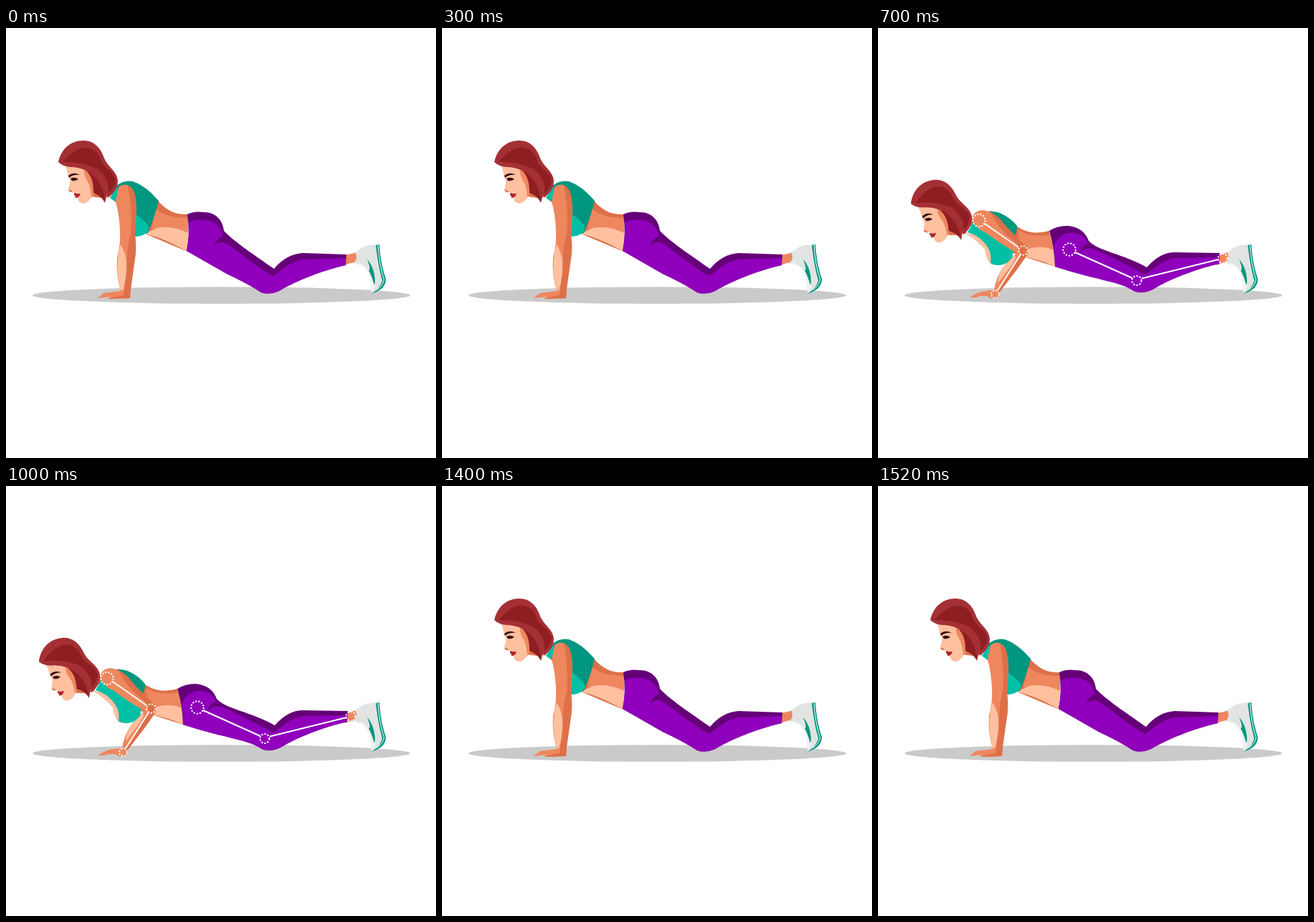
An HTML page for the animation above (1600 ms loop, 600 px wide and 600 px high).

```html
<!DOCTYPE html>
<html lang="en">
<head>
<meta charset="utf-8">
<title>Knee push-up</title>
<style>
  html, body { margin: 0; width: 100%; height: 100%; overflow: hidden; background: #fff; }
  svg { display: block; width: 100vw; height: 100vh; }

  .pose { opacity: 0; animation: 1600ms step-end infinite; }
  .high { animation-name: high; }
  .middle { animation-name: middle; }
  .low { animation-name: low; }
  @keyframes high { 0%, 87.5% { opacity: 1 } 31.25% { opacity: 0 } 100% { opacity: 1 } }
  @keyframes middle { 0%, 43.75%, 87.5%, 100% { opacity: 0 } 31.25%, 75% { opacity: 1 } }
  @keyframes low { 0%, 75%, 100% { opacity: 0 } 43.75% { opacity: 1 } }

  .skin { fill: #ef875e; }
  .shade { fill: #dd7048; }
  .glow { fill: #ffc0a0; }
  .teal { fill: #00bfa5; }
  .deep-teal { fill: #009680; }
  .purple { fill: #9000bc; }
  .deep-purple { fill: #650078; }
  .hair { fill: #a43035; }
  .deep-hair { fill: #8f1e22; }
  .ink { fill: #35110f; }
  .bones { fill: none; stroke: #fff; stroke-width: 2; }
  .joint { stroke-dasharray: 2.2 2; stroke-width: 2; }
</style>
</head>
<body>
<svg viewBox="0 0 600 600">
  <defs>
    <g id="head">
      <path class="shade" d="M111 201L130 205 146 235 133 237Q124 236 119 235L112 220Z"/>
      <path class="glow" d="M81 190Q86 198 86 206Q90 212 89 217L87 225Q88 229 95 229L96 233Q100 235 100 237Q101 245 109 245Q115 243 120 236L122 212 110 192Z"/>
      <path class="skin" d="M109 195Q108 204 112 211Q118 219 119 236L124 231 122 206Z"/>
      <path class="hair" d="M73 187C77 169 90 157 108 157C122 157 131 166 136 179C141 194 155 199 156 213C156 223 151 230 142 237L141 232 138 244Q133 234 122 230C122 217 120 207 112 199Q101 194 90 194Q79 193 73 187Z"/>
      <path class="deep-hair" d="M79 187Q91 172 106 167C121 165 130 174 133 186C137 196 149 199 153 212Q151 224 143 230C145 216 138 205 128 197Q106 186 79 187Z"/>
      <path class="deep-hair" d="M112 199C128 207 136 222 138 241Q131 233 122 230C123 216 120 207 112 199Z"/>
      <path class="ink" d="M87 206Q94 200 103 205Q94 204 88 209Z"/>
      <path class="ink" d="M90 210Q96 207 101 211Q96 214 92 213Z"/>
      <path fill="#b0232b" d="M95 230Q99 232 104 231Q102 237 97 237Q97 234 95 233Z"/>
      <path class="shade" d="M87 226Q90 225 92 228L94 229Q89 230 87 226Z"/>
    </g>

    <g id="shoe">
      <path fill="#e1e4e2" d="M487 313C492 311 497 304 507 303L519 302C522 320 524 335 528 351C527 360 518 367 511 370L509 365C511 352 506 341 499 333C494 329 489 331 485 328C490 323 490 318 487 313Z"/>
      <path fill="#f0f2f1" d="M485 328Q496 326 505 337Q512 350 516 360L511 370 509 365Q511 347 499 333Z"/>
      <path class="deep-teal" d="M504 323Q510 329 513 340Q516 352 514 359Q510 345 506 338Q510 338 504 323Z"/>
      <path class="deep-teal" d="M516 303L521 302C522 319 525 336 530 350C530 363 520 367 510 371C517 366 523 361 525 352C521 338 518 321 516 303Z"/>
      <path fill="none" stroke="#fff" d="M519 303C520 320 523 337 527.500 351Q526 360 517 365.500"/>
    </g>

    <path id="hand" class="skin" d="M162 366Q150 366 141 369L134 372 129 376Q136 377 143 374L152 374 157 377 167 377Q171 372 170 366Z"/>

    <g id="leg-joints">
      <circle class="joint" cx="361" cy="352.500" r="6.500"/>
      <circle class="joint" cx="481" cy="321.500" r="6.500"/>
      <path d="M368 349.500L475 323"/>
    </g>
    <circle id="large-joint" class="joint" r="8.700"/>
    <circle id="small-joint" class="joint" r="6.300"/>
    <circle id="wrist" class="joint" cx="163.500" cy="371.500" r="5.300"/>
    <path id="ankle" class="skin" d="M472 316Q480 317 488 313Q492 319 489 327Q481 327 473 331Z"/>
  </defs>

  <ellipse cx="300.500" cy="373" rx="263.500" ry="11.800" fill="#cacaca"/>

  <g class="pose high">
    <path class="shade" d="M150 220L180 216 212 241C225 256 238 261 254 260L253 312 194 287 150 240Z"/>
    <path class="skin" d="M209 252Q223 265 254 265L254 288Q230 276 203 281Z"/>
    <path class="glow" d="M254 286Q232 275 211 279Q201 283 194 287Q220 293 253 312Z"/>
    <path class="teal" d="M145 237L155 219 162 245Q153 244 145 237Z"/>
    <path class="deep-teal" d="M154 220Q165 212 177 214Q195 220 213 241Q209 260 198 286L176 290Z"/>
    <path class="teal" d="M179 259Q190 265 194 271Q203 278 196 286Q186 293 176 290Z"/>
    <use href="#ankle"/>
    <path class="deep-purple" d="M253 260Q262 255 276 257C294 257 303 270 304 283C318 298 347 317 374 336C386 322 398 315 414 314L475 316 474 331C438 339 403 354 381 367Q367 373 356 369C339 358 323 350 308 343L252 311Q257 286 253 260Z"/>
    <path class="purple" d="M252 311Q256 292 256 270Q265 267 275 268C291 268 300 278 303 290Q293 294 290 305Q294 298 304 299C323 309 348 333 373 346C388 335 397 326 413 323Q444 322 474 321L474 331C438 339 403 354 381 367Q367 373 356 369C339 358 323 350 308 343Z"/>
    <use href="#shoe"/>
    <path class="skin" d="M157 222Q167 214 176 224C184 237 182 263 180 289Q183 307 179 328L174 364 173 377 142 378 146 375 128 377 136 370 160 367Q153 342 155 320Q160 304 159 282Q158 260 153 242Z"/>
    <path class="shade" d="M170 219Q179 223 181 239C183 257 180 276 180 289Q183 307 179 328L174 364 173 377 142 378Q159 373 164 373L169 337Q168 306 174 288Q177 255 170 219Z"/>
    <path class="glow" d="M160 302Q168 315 168 330Q168 350 163 366L160 366Q151 331 160 302Z"/>
    <use href="#head"/>
  </g>

  <g class="pose middle">
    <path class="shade" d="M136 240L165 230 204 257C217 269 232 270 247 266L249 319 195 298 157 266Z"/>
    <path class="skin" d="M207 262Q222 275 249 272L250 297Q225 287 199 288Z"/>
    <path class="glow" d="M250 295Q224 284 199 288L194 300Q224 306 249 319Z"/>
    <path class="glow" d="M134 252L153 255 176 300 160 301Q155 280 134 259Z"/>
    <path class="deep-teal" d="M143 235Q154 227 168 230Q187 236 205 256Q203 277 194 301L178 302Z"/>
    <path class="teal" d="M136 249L145 235 163 257 153 261Z"/>
    <path class="teal" d="M147 251Q165 275 187 291L190 301C178 308 163 307 157 299Q166 284 147 251Z"/>
    <use href="#ankle"/>
    <path class="deep-purple" d="M247 266Q262 262 276 264C292 267 299 276 300 287C316 302 347 321 375 334C388 320 399 313 415 313L477 314 476 329C441 337 406 351 383 365Q368 372 357 367C338 354 308 346 249 319Q252 291 247 266Z"/>
    <path class="purple" d="M249 319Q251 304 251 291Q259 275 275 275C289 274 298 281 300 292Q292 293 290 306Q295 297 304 299C327 318 350 333 374 344C389 332 400 323 415 321L476 320 476 329C441 337 406 351 383 365Q368 372 357 367C338 354 308 346 249 319Z"/>
    <use href="#shoe"/>
    <use href="#hand"/>
    <path class="skin" d="M145 239Q149 231 158 231Q169 237 175 251L191 284 200 302Q200 313 193 323L170 368 162 367Q163 345 171 325L186 304 158 267Q149 256 145 239Z"/>
    <path class="shade" d="M165 235Q173 245 179 260L200 302Q200 313 193 323L170 368 166 367 190 313Q193 303 184 286Z"/>
    <path class="glow" d="M184 309Q185 317 179 326L165 354Q166 330 184 309Z"/>
    <use href="#head" x="-12.500" y="21"/>
    <g class="bones">
      <path d="M160 249L190 299M190 311L166 366M282 302L355 349"/>
      <use href="#large-joint" x="155" y="241.500"/>
      <use href="#small-joint" x="193" y="305"/>
      <use href="#wrist"/>
      <use href="#large-joint" x="274" y="297"/>
      <use href="#leg-joints"/>
    </g>
  </g>

  <g class="pose low">
    <path class="shade" d="M125 271L157 255 194 277C209 287 224 287 239 283L247 333 197 317 151 301Z"/>
    <path class="skin" d="M195 282Q214 293 241 288L246 312Q222 306 201 312Z"/>
    <path class="glow" d="M246 310Q227 302 207 309L203 319Q226 323 247 333Z"/>
    <path class="glow" d="M120 285L144 290 170 327 159 331Q151 325 149 309 138 296 120 285Z"/>
    <path class="deep-teal" d="M150 257Q163 254 174 260Q186 266 194 276Q194 286 190 292L170 290Z"/>
    <path class="teal" d="M125 285L133 270 191 302Q188 313 187 322C178 332 165 333 157 328Q160 312 147 298Q137 288 125 285Z"/>
    <use href="#ankle"/>
    <path class="deep-purple" d="M239 283Q250 276 264 276C281 277 290 286 294 297C306 311 342 315 375 334C388 320 399 313 415 313L477 314 476 329C441 337 406 351 383 365Q368 372 357 367C339 354 310 353 247 333Q246 304 239 283Z"/>
    <path class="purple" d="M247 333Q247 316 245 303Q253 287 268 286C282 285 290 292 293 301Q284 303 282 314Q289 305 300 308C326 319 351 333 374 344C389 332 400 323 415 321L476 320 476 329C441 337 406 351 383 365Q368 372 357 367C339 354 310 353 247 333Z"/>
    <use href="#shoe"/>
    <use href="#hand"/>
    <path class="skin" d="M131 267Q133 255 146 254Q158 255 170 267Q184 284 206 303Q212 309 208 317L193 338 170 368 162 367Q164 348 176 332L193 314Q171 301 149 285Q136 280 131 267Z"/>
    <path class="shade" d="M157 257Q168 263 174 271Q187 288 206 303Q212 309 208 317L193 338 170 368 166 367 195 322Q203 310 191 298Q170 284 157 257Z"/>
    <path class="glow" d="M192 317Q192 325 184 334L167 356Q168 336 192 317Z"/>
    <use href="#head" transform="translate(-25 56) rotate(-5.500 95 210)"/>
    <g class="bones">
      <path d="M149 273L196 306M199 316L167 366M275 313L355 349"/>
      <use href="#large-joint" x="141" y="268.500"/>
      <use href="#small-joint" x="202.500" y="310.500"/>
      <use href="#wrist"/>
      <use href="#large-joint" x="267" y="309"/>
      <use href="#leg-joints"/>
    </g>
  </g>
</svg>
</body>
</html>
```
